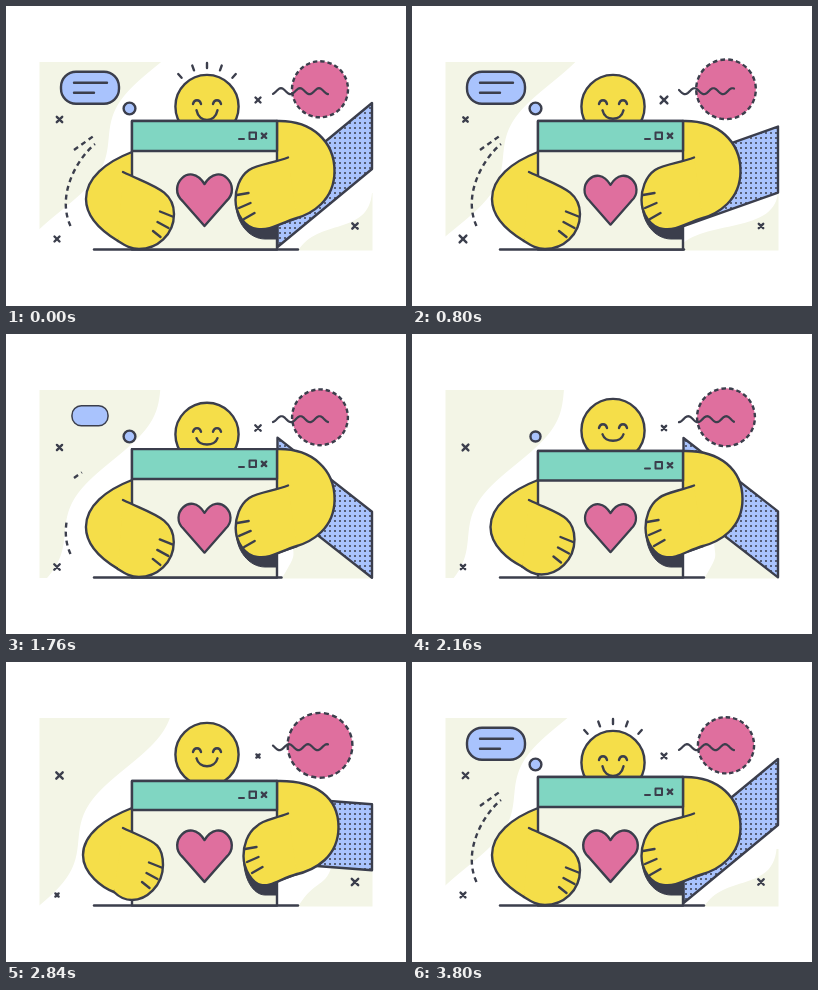
These frames come from a looping animation (400 by 300 pixels, 3.84 s). An HTML page with a canvas:

```html
<!DOCTYPE html>
<html lang="en">
<head>
<meta charset="utf-8">
<title>Hug</title>
<style>
  html, body { margin: 0; width: 100%; height: 100%; overflow: hidden; background: #fff; }
  canvas { display: block; }
</style>
</head>
<body>
<canvas width="400" height="300"></canvas>
<script>
const ctx = document.querySelector('canvas').getContext('2d');
const LOOP = 3840, TAU = Math.PI * 2;
const INK = '#3b3e4c', CREAM = '#f3f5e6', YELLOW = '#f5de49', TEAL = '#80d6c2', PINK = '#df6f9e', BLUE = '#a9c3fd';

const ramp = (t, from, to) => Math.max(0, Math.min(1, (t - from) / (to - from)));
const mix = (a, b, u) => a + (b - a) * u;
const smooth = u => u * u * (3 - 2 * u);
const cubic = u => u < .5 ? 4 * u ** 3 : 1 - 4 * (1 - u) ** 3;
const overshoot = u => 1 + 2.4 * (u - 1) ** 3 + 1.4 * (u - 1) ** 2;
const cycle = (t, period = LOOP) => TAU * t / period;

function draw(path, fill, stroke = INK, width = 2.4) {
  const p = typeof path === 'string' ? new Path2D(path) : path;
  if (fill) { ctx.fillStyle = fill; ctx.fill(p); }
  if (stroke) { ctx.strokeStyle = stroke; ctx.lineWidth = width; ctx.stroke(p); }
}

const line = (path, width) => draw(path, null, INK, width);

function disc(x, y, r, fill, stroke) {
  const p = new Path2D();
  p.arc(x, y, r, 0, TAU);
  draw(p, fill, stroke);
}

function placed(x, y, scale, turn, paint) {
  ctx.save();
  ctx.translate(x, y);
  ctx.rotate(turn);
  ctx.scale(scale, scale);
  paint();
  ctx.restore();
}

function dashed(pattern, paint) {
  ctx.save();
  ctx.lineCap = 'butt';
  ctx.setLineDash(pattern);
  paint();
  ctx.restore();
}

const cross = (x, y, r) =>
  line(`M${x - r} ${y - r}l${2 * r} ${2 * r}M${x + r} ${y - r}l${-2 * r} ${2 * r}`);

// Cream corners: a rippling slanted edge on the left, a sliding S-curve on the right.
function background(t) {
  const trough = 131 - 36 * Math.cos(cycle(t - 150));
  const foot = 292 - 30 * Math.sin(Math.PI * ramp(t, 0, 2160));
  const tip = 366 + 92 * (ramp(t, 1400, LOOP) - ramp(t, 800, 1400));
  let left = 'M0 244V56';
  for (let y = 56; y <= 244; y += 2)
    left += `L${mix(155, 31, (y - 56) / 188) - 2 - 13 * Math.cos(cycle(y - trough, 145))} ${y}`;
  ctx.save();
  ctx.beginPath();
  ctx.rect(33.5, 55.5, 333, 189);
  ctx.clip();
  draw(left, CREAM, null);
  draw(`M${foot} 245C${foot + 20} 212 ${tip - 4} 230 ${tip} 187H367V245Z`, CREAM, null);
  ctx.restore();
  line(`M88 243.5H${Math.max(272, foot)}`);
}

function crosses(t) {
  const s = Math.sin(cycle(t));
  cross(53.5, 113.5, 2.7 - .5 * s);
  cross(349, 220, 2.7 - .5 * s);
  cross(51, 233, 2.5 + .9 * s);
  cross(252, 94, 2.5 + .9 * s);
}

function bubble(t) {
  const early = t < 2600;
  const size = early ? 1 - ramp(t, 1640, 1960) : overshoot(ramp(t, 3080, 3560));
  const text = early ? 1 - ramp(t, 1480, 1680) : smooth(ramp(t, 3380, 3680));
  const dot = early ? 1 - ramp(t, 2120, 2400) : smooth(ramp(t, 2960, 3200));
  const turn = early ? 0 : .15 * (1 - ramp(t, 3080, 3520));
  if (size > .01) placed(84, 81.8, size, turn, () => {
    const box = new Path2D();
    box.roundRect(-29, -16, 58, 32, 15);
    draw(box, BLUE);
    if (text > 0) line(`M-16 -5h${33 * text}M-16 5h${20 * text}`);
  });
  if (dot > 0) disc(123.5, 102.5, 5.9 * dot, BLUE);
}

function trails(t) {
  const shown = t < 2400 ? 1 - smooth(ramp(t, 1480, 1960)) : smooth(ramp(t, 2960, 3320));
  const trail = (path, length) => {
    const pattern = [];
    for (let at = 0; at < length * shown; at += 9) pattern.push(Math.min(5, length * shown - at), 4);
    pattern[pattern.length - 1] = 999;
    dashed(pattern, () => line(path));
  };
  if (!shown) return;
  trail('M64.5 220C50 188 72 152 89 138', 96);
  trail('M68 144L89 129', 26);
}

function pinkDisc(t) {
  const r = 29.6 - 1.6 * Math.cos(cycle(t, LOOP / 2)) - 1.2 * Math.sin(cycle(t));
  const step = TAU * r / 24;
  disc(314, 83.3, r, PINK, null);
  placed(314, 83.3, 1, cycle(t) / 4, () => dashed([step * .6, step * .4], () => disc(0, 0, r)));

  const crest = 279 - 4 * Math.cos(cycle(t, LOOP / 2));
  let wave = '';
  for (let x = 267; x <= 322; x++)
    wave += `${wave ? 'L' : 'M'}${x} ${85.2 - 3 * Math.cos(cycle(x - crest, 19))}`;
  line(wave, 2.2);
}

function sun(t, squeeze) {
  const y = 100.5 - 8 * squeeze;
  const early = t < 2000;
  const inner = early ? 38 + 5 * ramp(t, 120, 640) : 38;
  const outer = early ? 43 : 38.2 + 4.8 * ramp(t, 3320, 3640);
  if (t < 640 || t > 3320) for (const deg of [-42, -20, 0, 20, 42])
    placed(201, 100, 1, cycle(deg, 360), () => line(`M0 ${-inner}V${-outer}`));

  disc(201, y, 31.6, YELLOW);
  const smile = 12.3 + 4.5 * Math.cos(cycle(t, LOOP * 2)) ** 2;
  placed(201, y, 1, 0, () => {
    line('M-14 -2.5c1 -5 7 -5 8 0M6 -2.5c1 -5 7 -5 8 0');
    line(`M-10.5 3.8C-8 ${smile} 8 ${smile} 10.5 3.8`);
  });
}

function sleeve(t) {
  const swing = cubic(1 - Math.abs(t / (LOOP / 2) - 1));
  const inner = mix(175, 103.5, swing), outer = mix(97, 178, swing);
  const shape = new Path2D(`M271.5 ${inner}L366 ${outer}v66L271.5 ${inner + 66}Z`);
  draw(shape, BLUE, null);
  ctx.save();
  ctx.clip(shape);
  for (let x = 274; x < 367; x += 5)
    for (let y = 97; y < 246; y += 5) disc(x, y, 1, INK, null);
  ctx.restore();
  draw(shape);
}

function arms(p) {
  const side = 80 - 3 * p, elbow = 328.5 + 4 * p, top = 115 + 4 * p;
  draw(`M126 146C100 156 ${side} 172 ${side} 193C${side} 212 97 226 ${112 - 4 * p} ${235 - 5 * p}L140 200Z`, YELLOW);
  draw(`M271 ${top}C${elbow - 22} ${top - 1} ${elbow} 136 ${elbow} 165C${elbow} 194 ${elbow - 22} 208 288 213L262 222V150Z`, YELLOW);
}

function panel(t, p) {
  const top = 115 + 4 * p;
  draw(`M126 ${top}H271V243.5H126Z`, CREAM);
  draw(`M126 ${top}H271V${145 + 3 * p}H126Z`, TEAL);
  placed(0, 3 * p, 1, 0, () => {
    line('M233 133h5M243.5 126.5h6.5v6.5h-6.5z', 2);
    cross(258, 129.8, 2.2);
  });
  const beat = 1 - .07 * Math.sin(cycle(t, LOOP / 4)) ** 2;
  placed(198.5, 194, beat, 0, () =>
    draw('M0 26L-22 1C-38 -13 -15 -40 0 -16C15 -40 38 -13 22 1Z', PINK));
}

// Each fist: fill hides the panel edge, the open outline follows the knuckles.
function fist(path) {
  draw(path, YELLOW, null);
  line(path);
}

function hands(p) {
  const x = 168 - 11 * p, y = -5 * p, base = 133 - 7 * p;
  fist(`M117 166C146 180 ${x} ${184 + y} ${x} ${208 + y}C${x} ${229 + y} ${x - 17} ${243 + y} ${base} ${243 + y}` +
    `C${base - 8} ${243 + y} ${base - 13} ${240 + y} ${112 - 4 * p} ${235 + y}`);
  placed(-11 * p, y, 1, 0, () => line('M154 205.5l12.5 5M151.5 216l11 6M147 225l7.5 6'));

  const s = 8 * p, edge = 229.5 + s;
  draw(`M${edge} 192C${edge - 1} 218 ${244 + s / 2} 233 259 233H271V205Z`, INK, INK, 1);
  fist(`M282 151.5C268 157 ${252 + s / 2} 158 ${243 + s} 164C${233 + s} 171 ${edge} 184 ${edge} 194` +
    `C${edge} 207 ${238 + s} 221 ${251 + s / 2} 223C265 225 274 217 291 212`);
  placed(s, -2 * p, 1, 0, () => line('M231 189l11.5 -2M233 202l11.5 -5M238 213l10.5 -6'));
}

function frame() {
  const t = (performance.now() - start) % LOOP;
  const squeeze = smooth(ramp(t, 1680, 2640)) * (1 - smooth(ramp(t, 2860, 3360)));
  ctx.fillStyle = '#fff';
  ctx.fillRect(0, 0, 400, 300);
  ctx.lineCap = ctx.lineJoin = 'round';
  background(t);
  crosses(t);
  bubble(t);
  trails(t);
  pinkDisc(t);
  sun(t, squeeze);
  sleeve(t);
  arms(squeeze);
  panel(t, squeeze);
  hands(squeeze);
  requestAnimationFrame(frame);
}

const start = performance.now();
frame();
</script>
</body>
</html>
```
